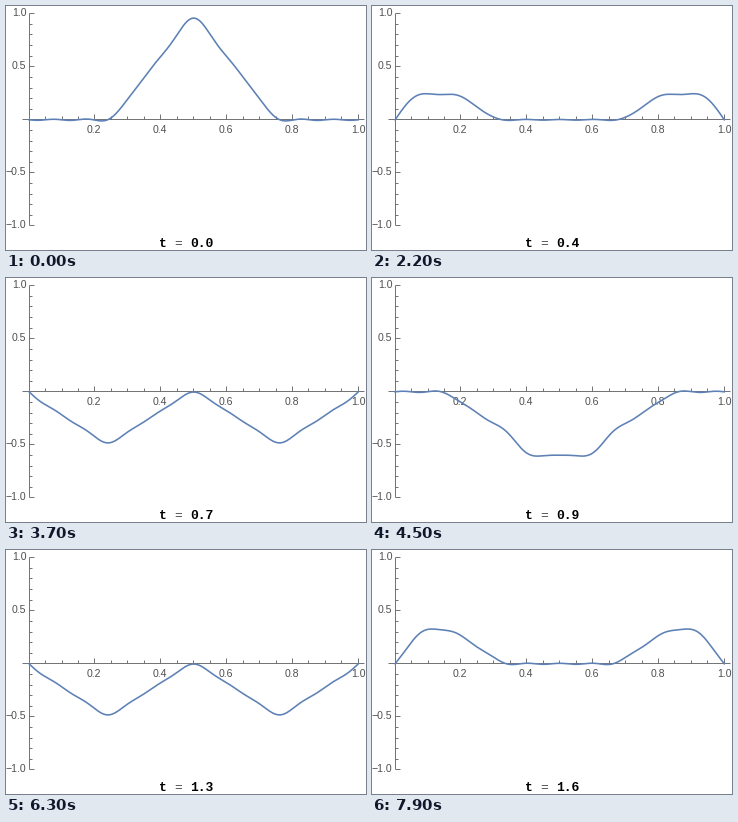
Write a matplotlib script that moves like this. It is 360 px wide and 244 px high and loops after 8 s.

```python
import numpy as np
import matplotlib.pyplot as plt
from matplotlib.animation import FuncAnimation

W, H, DPI = 360, 244, 72
FRAMES, INTERVAL, DT = 80, 100, 0.02
X0, Y0, SX, SY = 23.1, 113.8, 329.2, 106.0
GRAY, LABEL, BLUE = "#666666", "#505050", "#5e81b5"

# Sine series of a plucked string: a triangle on [1/4, 3/4] of height 1
n = np.arange(1, 21)
coef = 16 * np.sin(n * np.pi / 2) * (1 - np.cos(n * np.pi / 4)) / (n * np.pi) ** 2
x = np.linspace(0, 1, 500)
modes = np.sin(np.pi * np.outer(x, n))


def px(v):
    return X0 + SX * v


def py(v):
    return Y0 - SY * v


def string(t):
    return modes @ (coef * np.cos(np.pi * n * t))


fig = plt.figure(figsize=(W / DPI, H / DPI), dpi=DPI, facecolor="white")
ax = fig.add_axes([0, 0, 1, 1])
ax.set_xlim(0, W)
ax.set_ylim(H, 0)
ax.axis("off")


def segment(xs, ys):
    # Whole pixels keep the hairlines crisp
    ax.plot(np.floor(xs), np.floor(ys), color=GRAY, lw=0.9,
            solid_capstyle="butt", zorder=1)


def label(xp, yp, s, ha):
    ax.text(xp, yp, s, ha=ha, va="baseline", color=LABEL,
            family="Liberation Sans", size=10.5)


segment([px(-0.02), px(1.02)], [Y0, Y0])
segment([X0, X0], [py(1), py(-1)])

for i in range(1, 21):
    major = i % 4 == 0
    p = px(i / 20)
    segment([p, p], [Y0, Y0 - (5 if major else 3)])
    if major:
        label(np.floor(p) + 0.3, 126.7, f"{i / 20:.1f}", "center")

for i in range(-10, 11):
    if i == 0:
        continue
    major = i % 5 == 0
    p = py(i / 10)
    segment([X0, X0 + (5 if major else 3)], [p, p])
    if major:
        label(20.5, np.floor(p) + 3.2, f"{i / 10:.1f}".replace("-", "\u2212"), "right")

curve, = ax.plot([], [], color=BLUE, lw=1.6, solid_joinstyle="round", zorder=3)

mono = dict(family="Liberation Mono", size=13, va="baseline")
ax.text(153, 241, "t", weight="bold", color="black", **mono)
ax.text(168.6, 241, "=", color="#444444", **mono)
clock = ax.text(184.2, 241, "", weight="bold", color="black", **mono)


def update(i):
    t = i * DT
    curve.set_data(px(x), py(string(t)))
    clock.set_text(f"{t:.1f}")
    return curve, clock


anim = FuncAnimation(fig, update, frames=FRAMES, interval=INTERVAL,
                     repeat=True, repeat_delay=0)
plt.show()
```
